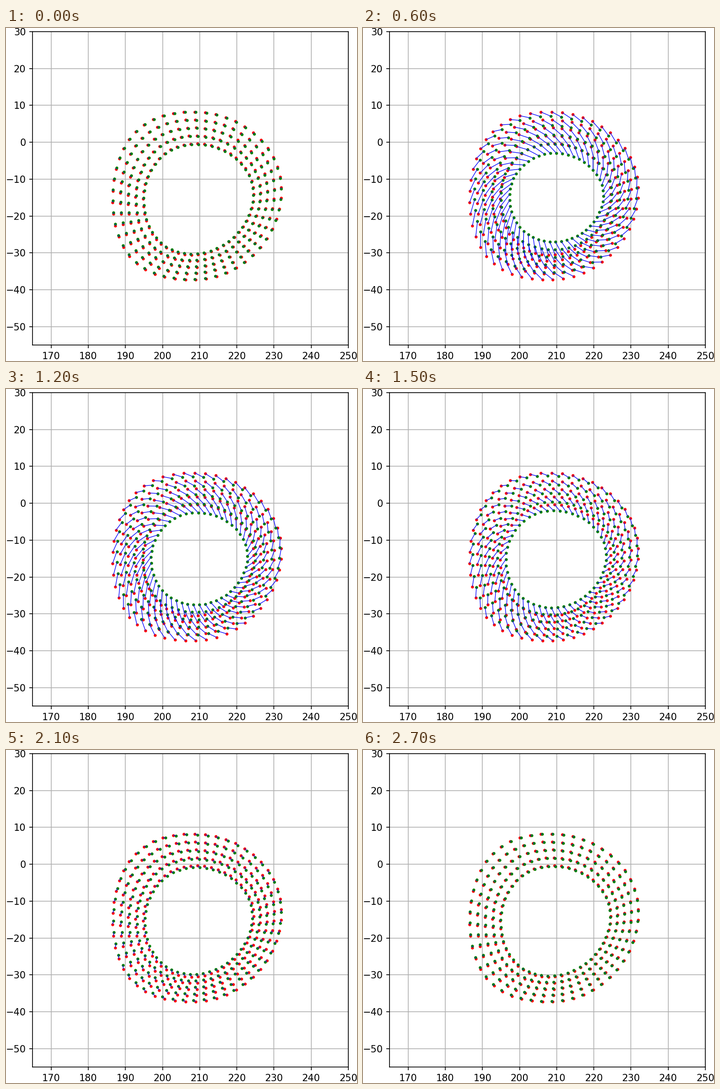
Animation, 768 px wide and 729 px high, one loop 2850 ms. Source, as a matplotlib script:

```python
import numpy as np
import matplotlib.pyplot as plt
from matplotlib.animation import FuncAnimation
from matplotlib.collections import LineCollection

WIDTH, HEIGHT, DPI = 768, 729, 150
LEFT, TOP, RIGHT, BOTTOM = 58, 8, 749, 694
SECTORS, LAYERS = 50, 5
CENTER = 417 + 368j

# Ring outlines at every third sector, in stage pixels (x + y j)
OUTER = [413+183j, 481+196j, 541+229j, 585+283j, 602+349j, 592+418j,
         557+480j, 504+525j, 438+549j, 370+549j, 305+529j, 257+480j,
         235+407j, 236+333j, 257+264j, 302+212j, 366+187j]
INNER = [419+253j, 464+262j, 503+284j, 532+321j, 542+364j, 533+409j,
         510+447j, 476+476j, 435+494j, 391+495j, 351+482j, 320+450j,
         303+407j, 301+358j, 316+312j, 347+275j, 389+256j]

# Peak displacement at every fifth sector
OUTER_SHIFT = [25+15j, 18+24j, 2+30j, -18+21j, -27+0j,
               -23-21j, -12-36j, 10-41j, 18-23j, 26-1j]
INNER_SHIFT = [20+28j, 3+33j, -16+26j, -27+6j, -25-16j,
               -14-36j, 2-46j, 20-40j, 32-15j, 32+13j]

# Twist over one beat, relative to its peak
TWIST = [.10, .20, .38, .62, .83, .95, 1, .88, .73, .64,
         .57, .50, .43, .33, .23, .17, .13, .11, .10]


def smooth_loop(samples, step, harmonics):
    """Fit a Fourier loop to samples and evaluate it at every sector."""
    orders = np.arange(-harmonics, harmonics + 1)
    angles = 2 * np.pi * np.arange(SECTORS) / SECTORS
    basis = np.exp(1j * np.outer(angles, orders))
    coeffs = np.linalg.lstsq(basis[::step], np.array(samples), rcond=None)[0]
    return basis @ coeffs


def fill_layers(outer, inner):
    depth = np.linspace(0, 1, LAYERS)[:, None]
    return ((1 - depth) * outer + depth * inner).ravel()


def to_data(points):
    x = 165 + (points.real - LEFT) * 85 / (RIGHT - LEFT)
    y = 30 - (points.imag - TOP) * 85 / (BOTTOM - TOP)
    return np.column_stack([x, y])


rest = fill_layers(smooth_loop(OUTER, 3, 6), smooth_loop(INNER, 3, 6))
shift = fill_layers(smooth_loop(OUTER_SHIFT, 5, 4),
                    smooth_loop(INNER_SHIFT, 5, 4))
outward = (rest - CENTER) / abs(rest - CENTER)
radial = (shift * outward.conj()).real * outward
tangential = shift - radial

fig = plt.figure(figsize=(WIDTH / DPI, HEIGHT / DPI), dpi=DPI)
ax = fig.add_axes([LEFT / WIDTH, 1 - BOTTOM / HEIGHT,
                   (RIGHT - LEFT) / WIDTH, (BOTTOM - TOP) / HEIGHT])
ax.set(xlim=(165, 250), ylim=(-55, 30))
ax.grid(True)

dots = dict(marker="o", ls="", ms=3.1, mew=0)
start = to_data(rest)
ax.plot(*start.T, color="red", zorder=2, **dots)
moved, = ax.plot([], [], color="green", zorder=2.1, **dots)
trails = LineCollection([], colors="blue", linewidths=0.65, zorder=2.2)
ax.add_collection(trails, autolim=False)


def update(frame):
    twist = TWIST[frame]
    end = to_data(rest + twist * tangential + twist ** 1.3 * radial)
    moved.set_data(*end.T)
    trails.set_segments(np.stack([start, end], axis=1))
    return moved, trails


animation = FuncAnimation(fig, update, frames=len(TWIST), interval=150,
                          init_func=lambda: update(0), repeat=True,
                          repeat_delay=0)
plt.show()
```
